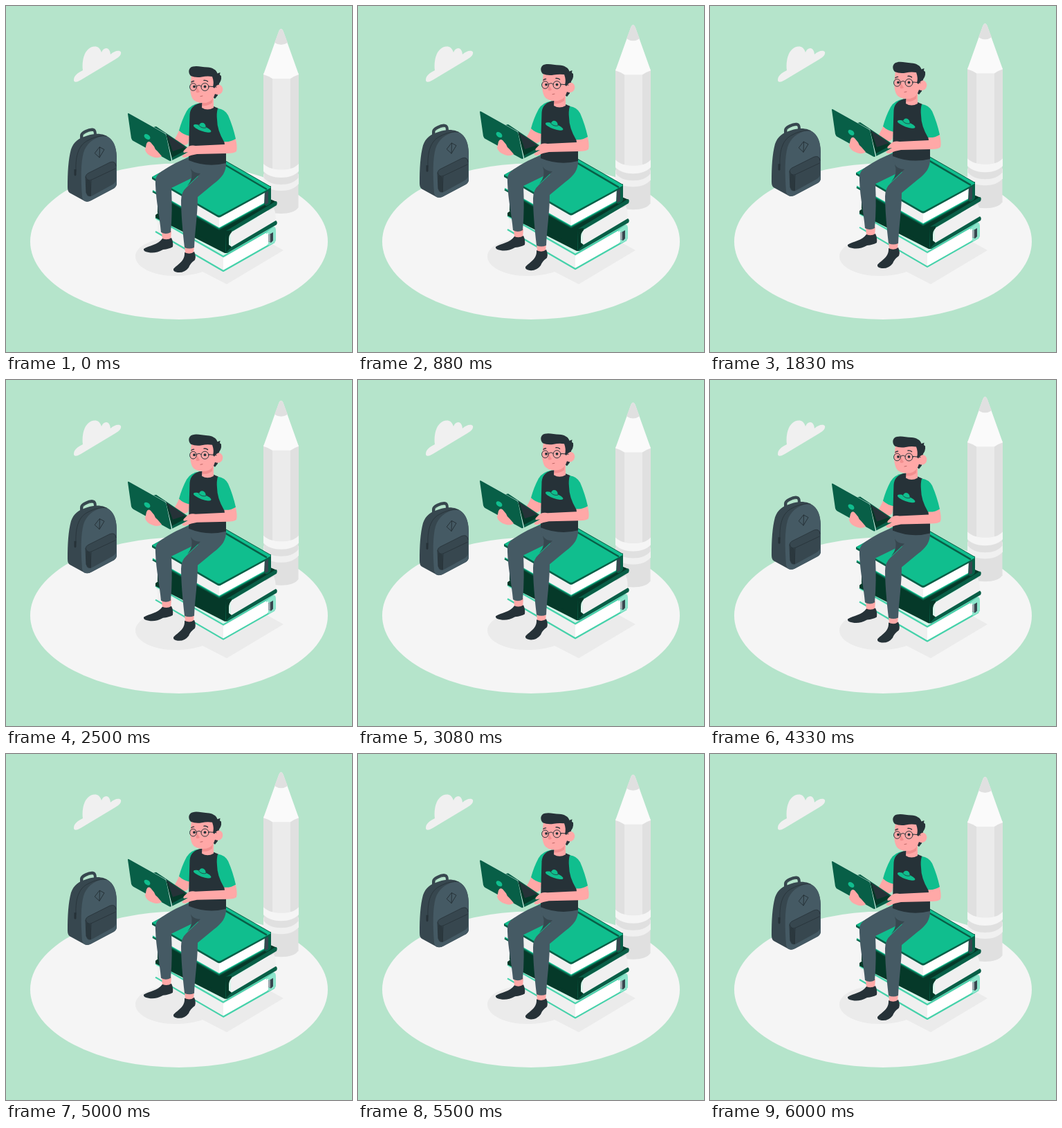
Recreate the animation shown at these times as an HTML page. Size 500 by 500 pixels, loop 6.04 s.

```html
<!DOCTYPE html>
<html lang="en">
<head>
<meta charset="utf-8">
<title>Reading on books</title>
<style>
  html, body { margin: 0; width: 100%; height: 100%; overflow: hidden; background: #b5e4cb; }
  svg { display: block; width: 100vw; height: 100vh; }
  .green { fill: #10be8e; } .deep { fill: #085f47; } .dark { fill: #053929; }
  .mint { fill: #d9f5eb; } .page { fill: #fff; } .shade { fill: #f0f0f0; }
  .ink { fill: #263238; } .slate { fill: #455a64; } .slate2 { fill: #37474f; }
  .skin { fill: #ffa8a7; } .skin2 { fill: #f28f8f; }
  .line { fill: none; stroke: #263238; stroke-linecap: round; stroke-linejoin: round; }
</style>
</head>
<body>
<svg viewBox="0 0 500 500">
  <ellipse cx="250" cy="340.300" rx="215" ry="112.700" fill="#f5f5f5"/>
  <path fill="#ebebeb" d="M243 335C212 335 187 347 187 362S212 390 243 390C259 390 273 388 284 384L319 402 401 353 372 337 300 330Z"/>
  <path fill="#f0f0f0" d="M98 107C98 101 103 97 111 93C109 74 116 59 128 58.500C133 58.500 136 61 138 67C141 59 150 58 151 70C156 65 164 63 166 66.500C167 71 163 74 158 77L108 107C103 110 98 111 98 107Z"/>

  <g id="pencil">
    <path fill="#e0e0e0" d="M372.500 250H422.500V291C419 297 409 300 397.500 300S376 297 372.500 291Z"/>
    <path fill="#f0f0f0" d="M372 243H423V257C417 264 408 267 397.500 267S378 264 372 257Z"/>
    <path fill="#e0e0e0" d="M372.500 236H422.500V248C417 255 408 258 397.500 258S378 255 372.500 248Z"/>
    <path fill="#f5f5f5" d="M372 225H423V239C417 245 408 248 397.500 248S378 245 372 239Z"/>
    <path fill="#e0e0e0" d="M372 97H385V235C380 234 375 231 372 228Z"/>
    <path fill="#ebebeb" d="M385 103H411V235C404 237 392 237 385 235Z"/>
    <path fill="#e0e0e0" d="M411 103L423 97V228C420 231 416 234 411 235Z"/>
    <path fill="#fafafa" d="M394.500 36Q397.500 30 400.500 36L423 99Q417 101 411 105H385Q379 101 372 99Z"/>
    <path fill="#e0e0e0" d="M394.500 36Q397.500 30 400.500 36L407 53Q397.500 59 388 53Z"/>
  </g>

  <g id="bag">
    <path fill="none" stroke="#37474f" stroke-width="4" d="M109 192V187C109 183 120 178 125 178.500C129 179 129 183 129 188"/>
    <path fill="none" stroke="#263238" stroke-width=".7" d="M111 190V187.500C112 184 121 180 126 180.500"/>
    <path class="slate2" d="M89 262C89 240 90 222 94 207C98 196 105 191 117 187.500C130 183 142 184 150 191C157 197 160 208 160 222V256Q160 261 156 263.500L123 281Q118 284 113 281.500L92 270Q89 268 89 262Z"/>
    <path class="slate" d="M110 276C108 250 108 226 112 212C116 199 126 191 139 188C145 187 149 190 152 193C158 199 160 209 160 222V256Q160 261 156 263.500L123 281Q112 286 110 276Z"/>
    <path class="line" stroke-width=".8" d="M101 239C100 214 106 200 119 194C128 189 138 187 145 188"/>
    <path class="ink" d="M98.500 236H101.500V244Q100 247 98.500 244Z"/>
    <path class="slate2" d="M115 248Q115 243 120 241L150 226Q159 223 159 231V251Q159 255 154 258L125 274Q117 278 116 270Z"/>
    <path class="line" stroke-width=".8" d="M116 270L115 248Q115 243 120 241L150 226Q158 223 159 231M115 247Q118 254 124 251L158 235M123 252L122 274"/>
    <path class="ink" d="M116 250L122 253 123 275Q117 275 116 270Z" opacity=".7"/>
    <path class="line" stroke-width="1" d="M135.500 204L142 207.500 135 219 128.500 213ZM135.500 204L135 219"/>
  </g>

  <g id="reader">
    <!-- bottom book -->
    <path class="mint" d="M217 307L292 268 389 319 314 363 217 310Z"/>
    <path class="shade" d="M219 311L314 364V382L219 327Z"/>
    <path class="page" d="M314 364L380 326V345L314 382Z"/>
    <path fill="none" stroke="#45d2aa" stroke-width="2.200" stroke-linejoin="round" d="M216 306L314 362 387 320M216 326L314 383 388 341"/>
    <path fill="#8ee5cc" d="M376 327L387 319Q390 319 390 325V339Q389 342 380 346L376 344Z"/>
    <path class="page" d="M375 330L379 328V344L375 346Z"/>
    <path class="slate2" d="M379 331L386 327V339L383 342 379 340Z"/>
    <path fill="#9aa8ad" d="M379 331L382 329V341L379 340Z"/>

    <!-- middle book -->
    <path class="dark" d="M219 283L294 242 391 283 320 325V356L219 299Z"/>
    <path class="dark" d="M216 302L220 299 319 353 320 357 316 357 216 306Z"/>
    <path class="shade" d="M325 328L387 292Q391 302 389 312L325 348Z"/>
    <path class="deep" d="M318 325L390 282Q393 283 391 288L325 327Q321 331 321 337V346Q322 350 326 348L390 310Q393 312 391 316L320 357 317 355Z"/>
    <path class="dark" d="M318 325L326 324V327Q322 331 322 337V345L326 348 318 356Z"/>

    <!-- top book -->
    <path class="shade" d="M216 251L308 304V323L216 269Z"/>
    <path class="page" d="M308 304L375 266V285L308 323Z"/>
    <path fill="none" stroke="#085f47" stroke-width="2.500" stroke-linejoin="round" d="M212 268L308 322.500 382 282"/>
    <path fill="none" stroke="#10be8e" stroke-width="1.300" stroke-linejoin="round" d="M212 266.500L308 321 382 280.500"/>
    <path class="deep" d="M374 265L383 260V283Q382 287 376 289L373 287Z"/>
    <path class="slate2" d="M374 269L379 266V285L374 287Z"/>
    <path class="deep" d="M211 247L286 206 383 262V265L311 304.500Q308 306.500 305 304.500L211 250Z"/>
    <path class="green" d="M213 246L284 207Q286 206 288 207L382 261Q384 262 381 263.500L311 301.500Q308 303.500 305 301.500L213 248Q210 247 213 246Z"/>
    <path fill="none" stroke="#085f47" stroke-width="2.500" d="M314 228L377 265"/>
    <path fill="none" stroke="#085f47" stroke-width="1" d="M314 222L383 261.500"/>

    <!-- legs -->
    <path class="skin" d="M225 325H239L238 339Q232 342 226 338ZM258 346H272L271 358Q265 361 259 357Z"/>
    <path class="ink" d="M226 336Q233 339 239 335Q242 341 241 348Q236 351 227 352Q216 358 206 356Q198 355 199 351C207 346 220 345 226 336Z"/>
    <path class="ink" d="M258 356Q266 360 272 355Q275 362 273 367Q266 372 264 378Q258 386 248 385Q241 384 242 380C248 373 259 369 258 356Z"/>
    <path class="slate" d="M268 218C252 222 231 234 221 242Q215 247 216 258C217 285 222 303 224 327Q231 331 238 327C240 305 240 285 239 263L280 243 292 222Z"/>
    <path class="slate" d="M264 220L318 224C319 240 312 248 300 257L277 276C277 301 273 325 272 349Q265 352 258 349C255 323 253 299 253 281Q253 269 261 262L278 246Q270 242 266 232Z"/>
    <path class="slate2" d="M267 235Q271 242 281 242L262 260Q272 248 267 235Z"/>

    <!-- far arm, body -->
    <path class="skin" d="M252 174L267 181 263 199 246 207 237 200Q247 191 252 174Z"/>
    <path class="green" d="M280 140.500Q267 142 261 152Q254 165 250 180Q256 186 266 188L280 164Z"/>
    <path class="ink" d="M283 140C273 141 266 147 265.500 157L264.500 190 264 223Q291 234 318 227V190Q318 165 307 148L300 145Z"/>
    <path class="skin" d="M284 131L300 132V147Q291 152 283 147Z"/>
    <path class="skin2" d="M284 140Q294 138 299 132L298 140Q291 145 284 144Z"/>

    <!-- saucer print -->
    <g class="green" transform="rotate(20 284 176)">
      <ellipse cx="284" cy="177" rx="13.500" ry="3.800"/>
      <path d="M278 175Q278 169 283 169Q288 170 288 175Z"/>
      <path fill="none" stroke="#263238" stroke-width=".7" d="M277 174Q283 178 289 174"/>
    </g>

    <!-- head -->
    <path class="ink" d="M298 102L309 103 306 129 302 134 297 130Z"/>
    <path class="skin" d="M268 100Q284 94 299 102L302 116Q306 112 311 115Q315 119 312 125Q308 130 302 127Q299 138 289 140Q273 141 269 133Q266 126 266 117Z"/>
    <path class="ink" d="M267 101C263 97 263 89 270 87.500C276 86 283 88 291 88.500C298 89 304 92 305.500 97.500L309.500 96 309 99.500 311 101Q312 109 306 114Q302 116 301 119L299 117Q301 110 298 102Q290 101 283 102.500Q274 104 267 101Z"/>
    <path class="skin2" d="M276 117Q274 123 275 125Q278 126 280 124Z"/>
    <path fill="none" stroke="#b8605f" stroke-width=".9" stroke-linecap="round" d="M281 130.500L284 130"/>
    <path class="line" stroke-width="1.400" d="M268 110Q269 108.500 271.500 108.500M286 107.500Q289 107 291.500 109"/>
    <circle class="ink" cx="272" cy="116.500" r="1.900"/>
    <circle class="ink" cx="287.500" cy="116.500" r="1.900"/>
    <g class="line" stroke-width="1">
      <ellipse cx="270.500" cy="117" rx="4.900" ry="5.300"/>
      <circle cx="287.500" cy="117" r="5.500"/>
      <path d="M275.500 116Q279 113 282 116M293 116L304 117"/>
    </g>

    <!-- laptop -->
    <path class="deep" d="M213 175L217 174 266 207V210L240 223 230 190Z"/>
    <path class="dark" d="M217 177L262 207 240 219 230 187Z"/>
    <path class="ink" d="M230 184L259 204 241 210 234 189Z"/>
    <path fill="#dff6ed" d="M177 155L231 184.500 240 222 239 224Z"/>
    <path class="deep" d="M176 156Q176 154.500 178 155.500L229 184Q231 185 231.500 187L239 223Q238 225 235 223L184 195Q182 194 181 191Z"/>
    <ellipse class="green" cx="204" cy="189" rx="5" ry="3.300" transform="rotate(38 204 189)"/>

    <!-- hands and near arm -->
    <path class="skin" d="M203 199Q205 194 209 197L214 203Q215 207 219 210L225 217Q220 221 212 218Q203 215 201 208Z"/>
    <path class="skin" d="M314 188L331 189Q335 203 333 210Q330 213 320 213L276 214Q268 215 259 219Q253 219 255 216L263 211 257 212Q255 210 259 207Q265 200 274 202L316 200Z"/>
    <path class="green" d="M306 148Q316 149 321 158Q328 174 332 192Q324 197 315 196Q305 179 305 164Q304 155 306 148Z"/>
  </g>
</svg>
<script>
  const LOOP = 6040, LIFT = 10;
  const parts = [["pencil", 3000], ["bag", 3000], ["reader", 6000]]
    .map(([id, period]) => ({ el: document.getElementById(id), period }));

  // Constant speed up to LIFT and back down once per period.
  const lift = (t, period) => LIFT * (1 - Math.abs(1 - 2 * (t % period) / period));

  function draw() {
    const t = Math.min(performance.now() % LOOP, 6000);
    for (const { el, period } of parts) {
      el.setAttribute("transform", `translate(0 ${-lift(t, period).toFixed(2)})`);
    }
    requestAnimationFrame(draw);
  }
  draw();
</script>
</body>
</html>
```
